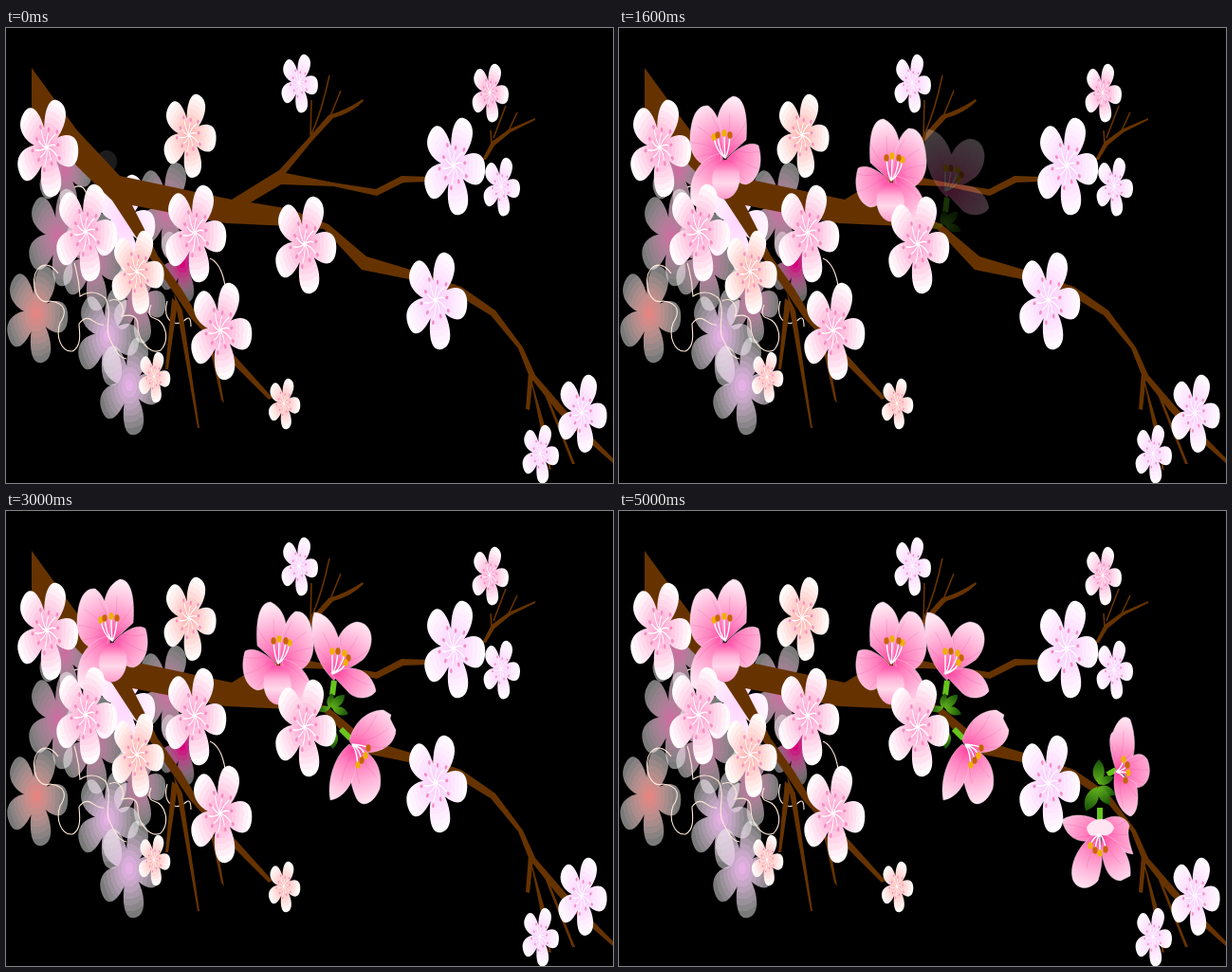
An HTML page that plays this animation: 640x480 px, repeating every 5.2 s.

```html
<!DOCTYPE html>
<html lang="en">
<head>
<meta charset="utf-8">
<title>Blossom branch</title>
<style>
html, body { margin: 0; width: 100%; height: 100%; overflow: hidden; background: #000; }
svg { display: block; width: 100%; height: 100%; }
</style>
</head>
<body>
<svg id="stage" viewBox="0 0 640 480"></svg>
<script>
const LOOP = 5200, TICK = 200;
const range = n => [...Array(n).keys()];
const mix = (a, b, t) => a + (b - a) * t;

// Radial gradient made of flat rings
function rings(id, inner, outer, alphaIn = 1, alphaOut = 1, count = 8) {
  const stops = range(count).map(i => {
    const t = i / (count - 1);
    const rgb = inner.map((v, k) => Math.round(mix(v, outer[k], t)));
    const look = `stop-color="rgb(${rgb})" stop-opacity="${mix(alphaIn, alphaOut, t)}"`;
    return `<stop offset="${i / count}" ${look}/><stop offset="${(i + 1) / count}" ${look}/>`;
  }).join('');
  return `<radialGradient id="${id}" gradientUnits="userSpaceOnUse" cx="0" cy="0" r="52">${stops}</radialGradient>`;
}

const WHITE = [255, 255, 255];
const defs = `<defs>
  ${rings('pink', [255, 164, 208], [255, 251, 253])}
  ${rings('lilac', [250, 204, 252], [255, 250, 255])}
  ${rings('peach', [255, 178, 176], [255, 252, 250])}
  ${rings('dimRed', [240, 140, 136], WHITE, .95, .48)}
  ${rings('dimPink', [238, 130, 188], WHITE, .85, .48)}
  ${rings('dimLilac', [242, 186, 242], WHITE, .95, .48)}
  ${rings('dimMagenta', [225, 0, 130], WHITE, .95, .4)}
  ${rings('pale', [255, 215, 255], [255, 244, 255])}
  <radialGradient id="bloom" gradientUnits="userSpaceOnUse" cx="0" cy="4" r="58">
    <stop offset="0" stop-color="#ff409f"/><stop offset=".28" stop-color="#ff80be"/>
    <stop offset=".6" stop-color="#ffb0d6"/><stop offset="1" stop-color="#ffe8f3"/>
  </radialGradient>
  <linearGradient id="lip" x1="0" y1="0" x2="0" y2="1">
    <stop offset="0" stop-color="#ff4ba5"/><stop offset=".35" stop-color="#ffb4d8"/>
    <stop offset=".6" stop-color="#ffd9eb"/><stop offset="1" stop-color="#ff9acb"/>
  </linearGradient>
  <linearGradient id="leaf" x1="0" y1="0" x2="1" y2="0">
    <stop offset="0" stop-color="#63b51d"/><stop offset="1" stop-color="#154f08"/>
  </linearGradient>
</defs>`;

// Five teardrop petals around the origin
const petals = range(5).map(i => {
  const a = (-66 + 72 * i) * Math.PI / 180;
  const p = (x, y) => `${(x * Math.cos(a) - y * Math.sin(a)).toFixed(1)} ${(x * Math.sin(a) + y * Math.cos(a)).toFixed(1)}`;
  return `M0 0C${p(14, -17)} ${p(53, -27)} ${p(53, 0)}C${p(53, 27)} ${p(14, 17)} 0 0`;
}).join('');

const stamens = range(10).map(i => {
  const r = i % 2 ? 20 : 15;
  return `<g transform="rotate(${i * 36 - 80})"><path d="M0 0Q${r / 2} -3 ${r} 0" fill="none" stroke="#fff" stroke-width="1.5"/>
    <ellipse cx="${r + 4}" rx="2.5" ry="1.9" fill="#f58cc0"/></g>`;
}).join('');

const flower = ([x, y, size, fill], hearts = true) =>
  `<g transform="translate(${x} ${y}) scale(${.63 * size} ${size})"><path d="${petals}" fill="url(#${fill})"/>${hearts ? stamens : ''}</g>`;

const dimFlowers = [
  [62, 150, .86, 'dimPink'], [170, 192, 1, 'dimPink'], [186, 248, .8, 'dimMagenta'],
  [55, 220, 1, 'dimPink'], [140, 288, .85, 'dimPink'], [91, 246, 1, 'dimPink'],
  [124, 205, 1, 'pale'], [32, 301, 1, 'dimRed'], [107, 325, 1, 'dimLilac'], [130, 377, 1, 'dimLilac']
];

const flowers = [
  [43, 126, 1, 'pink'], [193, 113, .86, 'peach'], [84, 215, 1, 'pink'], [199, 216, 1, 'pink'],
  [138, 257, .86, 'peach'], [315, 228, 1, 'pink'], [226, 319, 1, 'pink'], [453, 287, 1, 'lilac'],
  [472, 145, 1, 'lilac'], [607, 406, .8, 'lilac'], [563, 449, .6, 'lilac'], [522, 167, .6, 'lilac'],
  [309, 58, .6, 'lilac'], [510, 68, .6, 'pink'], [293, 396, .52, 'peach'], [156, 368, .52, 'peach']
];

const branch = `<path fill="#663300" d="M27 42L75 108L120 156L238 181L288 150L318 117L340 92Q360 86 376 75L377 77Q364 90 345 95L322 120
  L295 153L345 163L390 170L417 156L447 157V162L419 163L391 177L345 167L290 165L258 184L300 191L340 207L380 241L430 256L480 273
  L516 298L545 337L558 366L590 403L640 454V459L600 424L580 403L551 366L540 338L511 303L470 278L425 265L375 255L335 212L300 209
  L232 206L133 187L160 240L185 275L200 300L245 350L281 390L277 392L240 355L195 306L172 272L150 240L112 182L75 146L27 92Z
  M177 280L186 298L204 422H202ZM175 285L181 290L171 360H168ZM215 338L221 345L230 396L227 392Z
  M551 362L556 366L552 403L548 402ZM552 364L569 423L564 424ZM566 382L572 390L600 460L597 460ZM571 445L575 466L572 465Z
  M502 139L512 120L530 107L558 95V97L532 110L515 124L506 139Z"/>
  <path fill="none" stroke="#663300" stroke-width="1.6" d="M321 116L322 76M322 112Q333 88 341 50M342 93L353 66M512 122L511 108M514 116L527 82M530 108L539 89"/>`;

const curls = `<path fill="none" stroke="#ffe9d8" stroke-width="1.1" d="M55 259C40 238 23 258 32 280Q37 291 46 288C64 290 64 301 57 311
  C52 325 58 342 70 341C81 336 77 318 77 312C88 298 93 315 103 313M72 168Q84 163 86 181M72 248Q77 264 78 283Q92 274 105 285
  C112 300 105 311 108 325C115 340 119 348 127 349M109 288C120 282 127 297 122 304Q139 300 139 314C139 330 152 345 163 340
  C173 329 169 310 156 306Q148 304 153 292M170 288C164 310 180 317 190 307Q195 303 195 315M215 243Q227 248 231 272"/>`;

const leaf = (x, y, turn, size) =>
  `<path transform="translate(${x} ${y}) rotate(${turn}) scale(${size})" d="M0 0C6 -7 14 -6 20 0C14 6 6 6 0 0" fill="url(#leaf)"/>`;

const stalk = d => `<path d="${d}" fill="none" stroke="#67c51d" stroke-width="6"/>`;

const wide = {
  petals: ['M0 8C-12 -12 -14 -48 8 -58C20 -58 24 -38 22 -12Z',
    'M-3 13C-24 22 -38 6 -37 -14C-36 -36 -30 -49 -18 -48C-6 -40 0 -15 -3 13',
    'M-4 2C-28 6 -40 30 -36 54C-30 62 -18 60 -10 48Z',
    'M2 8C10 -2 26 -12 35 -6C41 14 34 32 22 35C10 34 2 22 2 8'],
  lip: 'M0 9C-15 10 -19 40 -6 49C6 56 20 38 14 18Q8 8 0 9',
  tips: [[-12, -15], [-8, -17], [-1, -19], [5, -17]], root: [0, 7]
};

// Fades: first tick before showing, number of ticks to full
const blooms = [
  { at: [112, 130], from: 0, ticks: 3, ...wide },
  { at: [287, 154], from: 4, ticks: 3, flip: true, ...wide },
  { at: [348, 165], from: 7, ticks: 4, root: [-4, 7],
    petals: ['M-4 6C-4 -30 8 -46 22 -48C40 -47 42 -22 28 -8Q12 4 -4 6',
      'M-2 14C-22 -5 -30 -35 -23 -58C-8 -57 4 -40 6 -10Z',
      'M-6 6C18 -6 38 4 42 25C37 33 22 35 14 27Z'],
    tips: [[-4, -17], [2, -17], [9, -15], [13, -10], [10, -5]],
    extra: stalk('M-2 14L-4 29') + leaf(-7, 43, -80, .8) + leaf(-5, 43, -45, 1) + leaf(-4, 43, 20, .9) + leaf(-6, 42, 165, .7) },
  { at: [368, 248], from: 11, ticks: 3, root: [-3, -2],
    petals: ['M-6 -6C0 -28 15 -38 30 -38L38 -33L37 -29L43 -17C42 0 25 10 0 6Z',
      'M-2 0C20 5 30 25 26 45C20 60 8 66 2 56C-6 40 -8 20 -2 0',
      'M-6 -2C-22 10 -30 38 -26 57C-8 54 4 30 2 4Z'],
    tips: [[3, 20], [7, 15], [11, 10], [14, 2]],
    extra: stalk('M-15 -18L-5 -8') + leaf(-22, -17, 95, 1) },
  { at: [507, 340], from: 15, ticks: 3, root: [0, 1],
    petals: ['M0 -12C-14 -22 -32 -20 -40 -14C-36 2 -26 10 -10 8Z',
      'M0 -12C14 -22 28 -18 31 -8C28 2 32 12 35 22C20 20 8 10 0 0',
      'M2 0C20 5 34 25 32 45L22 50C8 50 0 30 2 0',
      'M-4 0C-22 10 -34 35 -28 50C-22 61 -10 59 -2 50C4 30 4 10 -4 0'],
    pale: 'M-14 -6C-8 -18 10 -18 15 -6C12 4 4 3 0 1C-8 5 -13 2 -14 -6',
    tips: [[-10, 13], [-5, 18], [0, 21], [6, 17]],
    extra: stalk('M0 -27L0 -10') + leaf(-2, -49, 25, 1) + leaf(-2, -48, 55, 1.1) + leaf(-3, -49, 115, 1.4) },
  { at: [527, 272], from: 16, ticks: 3, root: [-3, 3],
    petals: ['M0 8C-10 -15 -12 -36 -6 -39C0 -55 7 -57 12 -52C20 -30 18 0 0 8',
      'M0 0C10 -12 22 -22 30 -10C36 5 30 20 18 20Z',
      'M-4 2C-8 25 0 45 12 50C20 48 22 30 18 15Z'],
    tips: [[5, -10], [9, -4], [10, 4], [7, 12]],
    extra: stalk('M-12 6L-3 1') + leaf(-21, 16, -90, 1.3) + leaf(-22, 16, -25, .9) }
];

function drawBloom(b) {
  const shape = d => `<path d="${d}" fill="url(#bloom)" stroke="#ffe0f0" stroke-opacity=".6" stroke-width=".7"/>`;
  const [rx, ry] = b.root;
  const veins = range(13).map(i => {
    const a = i * Math.PI * 2 / 13;
    const x = Math.cos(a), y = Math.sin(a);
    return `M${x * 11} ${y * 11}Q${x * 25 - y * 3} ${y * 25 + x * 3} ${x * 40} ${y * 40}`;
  }).join('');
  const clip = `clip${b.from}`;
  const threads = b.tips.map(([x, y]) => `M${rx} ${ry}Q${mix(rx, x, .8)} ${mix(ry, y, .3)} ${x} ${y}`).join('');
  const anthers = b.tips.map(([x, y], i) =>
    `<ellipse cx="${x}" cy="${y}" rx="2.6" ry="3.8" fill="${i % 2 ? '#c86400' : '#f0b000'}"/>`).join('');
  return `<g class="bloom" opacity="0" transform="translate(${b.at}) scale(${b.flip ? -1 : 1} 1)">
    <clipPath id="${clip}">${b.petals.map(d => `<path d="${d}"/>`).join('')}</clipPath>
    ${b.extra || ''}${b.petals.map(shape).join('')}
    <path clip-path="url(#${clip})" d="${veins}" fill="none" stroke="#d9479a" stroke-opacity=".35" stroke-width=".6"/>
    ${b.lip ? `<path d="${b.lip}" fill="url(#lip)"/>` : ''}${b.pale ? `<path d="${b.pale}" fill="#ffe4f1"/>` : ''}
    <path d="${threads}" fill="none" stroke="#fff" stroke-width="1.4"/>${anthers}</g>`;
}

const stage = document.getElementById('stage');
stage.innerHTML = defs
  + '<ellipse cx="106" cy="141" rx="11" ry="12" fill="#1c1c1c"/>'
  + dimFlowers.map(f => flower(f, false)).join('')
  + curls + branch
  + blooms.map(drawBloom).join('')
  + flowers.map(f => flower(f)).join('');

const layers = stage.querySelectorAll('.bloom');
const start = performance.now();

function show(now) {
  const tick = Math.floor(Math.max(0, now - start) % LOOP / TICK);
  blooms.forEach(({ from, ticks }, i) =>
    layers[i].setAttribute('opacity', Math.min(1, Math.max(0, (tick - from) / ticks))));
  requestAnimationFrame(show);
}
show(start);
</script>
</body>
</html>
```
